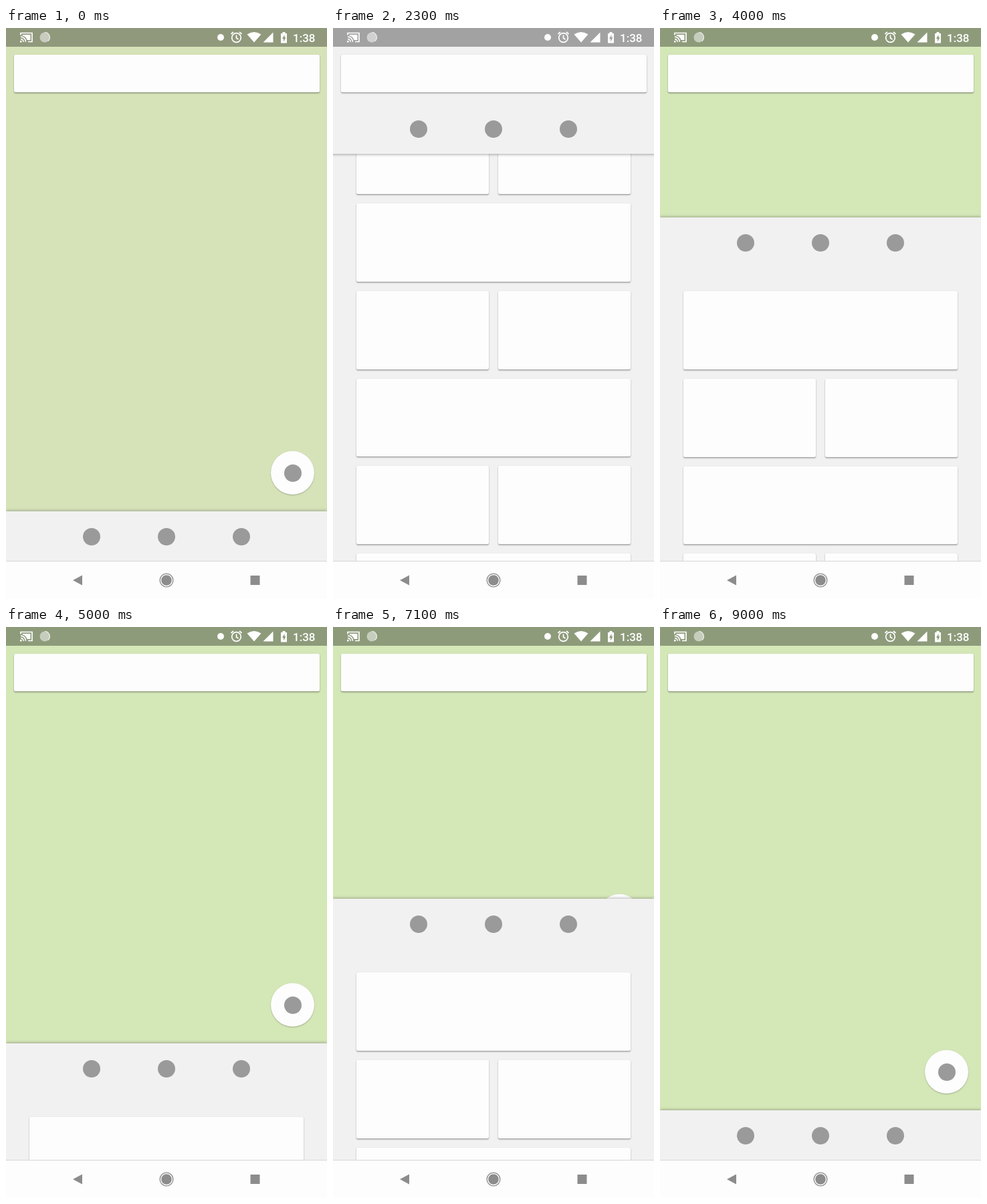
Recreate the animation shown at these times as an HTML page. Size 480x853 px, loop 10000 ms.

```html
<!DOCTYPE html>
<html lang="en">
<head>
<meta charset="utf-8">
<title>Bottom sheet</title>
<style>
  html, body { margin: 0; width: 100%; height: 100%; overflow: hidden; }
  #stage { position: relative; width: 480px; height: 853px; overflow: hidden; }
  #stage div, #stage svg { position: absolute; }
  .card {
    background: #fdfdfe; border-radius: 2px;
    box-shadow: 0 1.5px 2px rgba(0, 0, 0, .34), 0 0 1px rgba(0, 0, 0, .15);
  }
  .dot { width: 26px; height: 26px; border-radius: 50%; background: #9a9a9a; }
  #fab {
    left: 396px; top: -33px; width: 65px; height: 65px; border-radius: 50%;
    background: #fdfdfe; box-shadow: 0 1px 2px rgba(0, 0, 0, .25);
  }
  #fab .dot { left: 20px; top: 20px; }
  #sheet, #header, #cover { left: 0; width: 480px; background: #f2f1f2; }
  #sheet { top: 0; height: 740px; box-shadow: 0 -1px 4px rgba(0, 0, 0, .28); }
  #header { top: 0; height: 75px; }
  #list { left: 0; top: 75px; width: 480px; height: 665px; overflow: hidden; }
  #rows { left: 0; top: 35px; }
  #edge {
    left: 0; top: 75px; width: 480px; height: 5px;
    background: linear-gradient(rgba(0, 0, 0, .24), rgba(0, 0, 0, .07) 50%, transparent);
  }
  #cover { top: 0; height: 113px; }
  #search { left: 11.5px; top: 39.5px; width: 457px; height: 56.5px; }
  #status { left: 0; top: 0; width: 480px; height: 28px; background: rgba(0, 0, 0, .33); }
  #nav {
    left: 0; top: 797px; width: 480px; height: 56px;
    background: #fdfdfe; box-shadow: 0 -1px 0 #d6d6d6;
  }
</style>
</head>
<body>
<div id="stage">
  <div id="fab"><div class="dot"></div></div>
  <div id="sheet">
    <div id="list"><div id="rows"></div></div>
    <div id="header"></div>
    <div id="edge"></div>
  </div>
  <div id="cover"></div>
  <div id="search" class="card"></div>
  <div id="status">
    <svg width="480" height="28" fill="#fff">
      <g fill="none" stroke="#fff" stroke-width="1.7">
        <path d="M22 10.5V7.5H39V20.5H33M22 13.2a7.5 7.5 0 0 1 7.5 7.5M22 16.6a4.2 4.2 0 0 1 4.2 4.2"/>
        <circle cx="344.5" cy="14.5" r="6.8"/>
        <path d="M344.5 10.5V15L347.5 17M336.5 9L340 6M352.5 9L349 6"/>
      </g>
      <path d="M24.500 10H36.500V18H31.500A10 10 0 0 0 24.500 11.300Z"/>
      <rect x="21" y="19" width="2.5" height="2.5"/>
      <circle cx="58" cy="14" r="7.5" opacity=".5"/>
      <path d="M58 6.5a7.5 7.5 0 0 1 5 13" fill="none" stroke="#fff" stroke-width="1.2" opacity=".8"/>
      <circle cx="321" cy="14" r="5"/>
      <path d="M360.5 9.5Q371 2.5 381.5 9.5L371 21.5Z"/>
      <path d="M384.5 21.5L399.5 6.5V21.5Z"/>
      <path fill-rule="evenodd" d="M411 8H413.5V6H417.5V8H420V22.5H411ZM416.5 10L413 16H415V20.5L418.5 14H416.5Z"/>
      <text x="429" y="20.5" font-family="Roboto, sans-serif" font-size="17" font-weight="500">1:38</text>
    </svg>
  </div>
  <div id="nav">
    <svg width="480" height="56" fill="#8c8c8c">
      <path d="M100 28L114 20.5V35.5Z"/>
      <circle cx="240" cy="28" r="9.9" fill="none" stroke="#8c8c8c" stroke-width="1.3"/>
      <circle cx="240" cy="28" r="7.8"/>
      <rect x="365.5" y="21" width="14" height="14"/>
    </svg>
  </div>
</div>
<script>
  const LOOP = 10000, STEP = 100;
  const CLOSED = 722, ANCHOR = 489, OPEN = 113;
  const ROW = 130.75, GAP = 14;
  const $ = id => document.getElementById(id);

  function add(parent, cls, style) {
    const el = document.createElement('div');
    el.className = cls;
    for (const key in style) el.style[key] = style[key] + 'px';
    parent.append(el);
  }

  for (let i = 0; i < 3; i++) add($('header'), 'dot', { left: 115 + i * 112, top: 25 });

  // Rows alternate between one wide card and two narrow ones.
  for (let i = 0; i < 9; i++) {
    const count = 1 + i % 2, width = (410 + GAP) / count - GAP;
    for (let j = 0; j < count; j++) {
      add($('rows'), 'card', { left: 35 + j * (width + GAP), top: i * ROW, width, height: ROW - GAP });
    }
  }

  // Each swipe eases the sheet to a new place; past OPEN the list scrolls.
  const swipes = [
    { at: 1600, ms: 780, to: -400 },
    { at: 2756, ms: 744, to: CLOSED },
    { at: 3800, ms: 300, to: 136 },
    { at: 4100, ms: 400, to: CLOSED },
    { at: 4900, ms: 127, to: 610 },
    { at: 5100, ms: 400, to: CLOSED },
    { at: 5600, ms: 500, to: OPEN },
    { at: 6300, ms: 400, to: CLOSED },
    { at: 6900, ms: 391, to: OPEN },
    { at: 7800, ms: 500, to: -155 },
    { at: 8400, ms: 500, to: CLOSED }
  ];

  const clamp = u => Math.min(1, Math.max(0, u));
  const ease = u => (1 - Math.cos(Math.PI * clamp(u))) / 2;
  const position = t => swipes.reduce((p, s) => p + (s.to - p) * ease((t - s.at) / s.ms), CLOSED);
  const move = (id, y) => { $(id).style.transform = `translateY(${y}px)`; };

  function draw(t) {
    const p = Math.round(position(t)), top = Math.max(OPEN, p);
    move('sheet', top);
    move('rows', Math.min(0, p - OPEN));
    move('fab', Math.max(top, ANCHOR) - 57);
    $('cover').style.opacity = $('edge').style.opacity = clamp((130 - top) / (130 - OPEN));
    $('stage').style.background = t < 2500 ? '#d6e3b9' : '#d4e7b7';
  }

  const start = performance.now();
  function tick() {
    const t = (performance.now() - start) % LOOP;
    draw(Math.floor(t / STEP) * STEP);
    requestAnimationFrame(tick);
  }
  tick();
</script>
</body>
</html>
```
